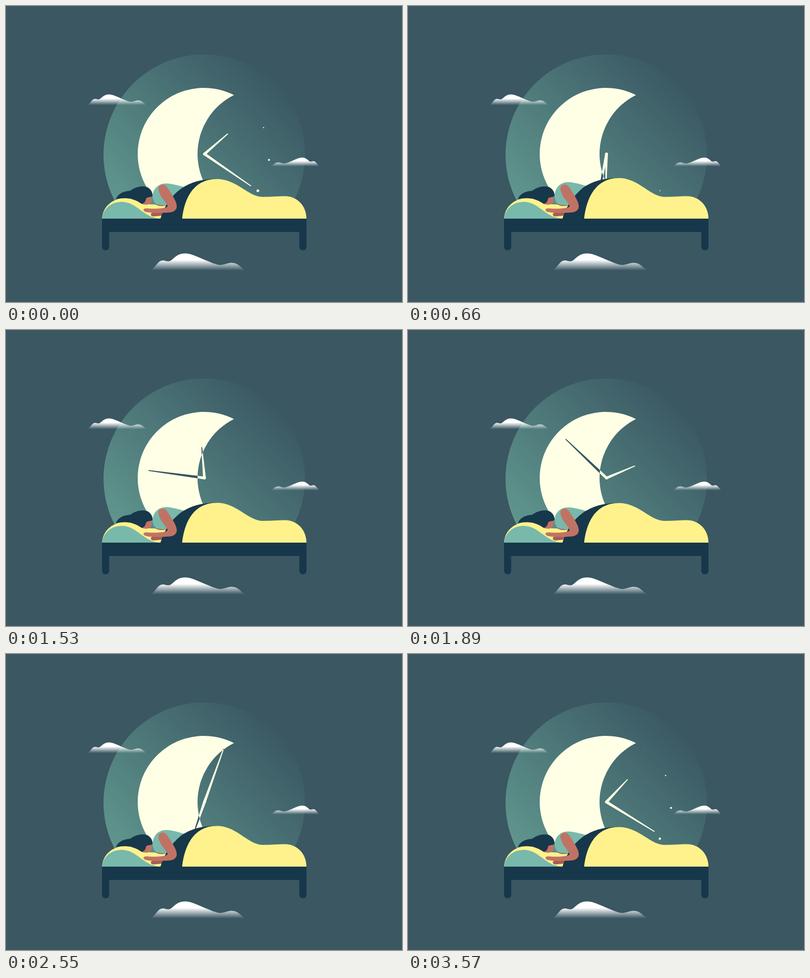
An HTML page that plays this animation: 800 by 600 pixels, repeating every 3.6 s.

```html
<!DOCTYPE html>
<html lang="en">
<head>
<meta charset="utf-8">
<title>Sleeping under the moon clock</title>
<style>
  html, body { margin: 0; width: 100%; height: 100%; overflow: hidden; background: #3a5762; }
  svg { display: block; width: 800px; height: 600px; }
</style>
</head>
<body>
<svg viewBox="0 0 800 600">
  <defs>
    <linearGradient id="sky" gradientUnits="userSpaceOnUse" x1="257" y1="445" x2="544" y2="158">
      <stop offset="0" stop-color="#60978e"/>
      <stop offset="1" stop-color="#3b5964"/>
    </linearGradient>
    <linearGradient id="mist" x1="0" y1="0" x2="0" y2="1">
      <stop offset=".38" stop-color="#fff"/>
      <stop offset="1" stop-color="#fff" stop-opacity="0"/>
    </linearGradient>
    <path id="crescent" d="M460.5,180.4 A134,134 0 1 0 460.5,419.6 A134,134 0 0 1 460.5,180.4Z"/>
    <clipPath id="inMoon"><use href="#crescent"/></clipPath>
    <clipPath id="aboveBed"><rect width="800" height="432"/></clipPath>
    <path id="cloud" d="M0,35 C9,28 13,18 20,15.500 C27,13 29,17 36,16.500 C45,15 49,0.500 69,0.500 C81,0.500 95,8 107,13 C120,18 132,24 140,24 C148,24 154,19.500 163,19.500 C176,19.500 180,28 190,35Z" fill="url(#mist)"/>
    <g id="hands">
      <path id="long" d="M-2.800,0 A2.800,2.800 0 0 0 2.800,0 L0.900,-113.500 A0.900,0.900 0 0 0 -0.900,-113.500Z"/>
      <path id="short" d="M-2.800,0 A2.800,2.800 0 0 0 2.800,0 L0.900,-62 A0.900,0.900 0 0 0 -0.900,-62Z"/>
    </g>
  </defs>

  <rect width="800" height="600" fill="#3a5762"/>
  <g clip-path="url(#aboveBed)">
    <circle cx="400.500" cy="301.500" r="203.500" fill="url(#sky)"/>
    <use href="#crescent" fill="#ffffe6"/>
    <use href="#hands" fill="#ffffe6"/>
    <g clip-path="url(#inMoon)"><use href="#hands" fill="#365460"/></g>
    <g id="dots" fill="#ffffe6"></g>
  </g>

  <use href="#cloud" transform="translate(293 501)"/>
  <use href="#cloud" transform="translate(165 179) scale(.626)"/>
  <use href="#cloud" transform="translate(633.500 307) scale(-.513 .513)"/>

  <path fill="#fff28c" d="M194,431 C196,404 218,389 243,389 C262,389 276,400 290,402 L330,403 L322,431Z"/>
  <path fill="#78b9ab" d="M194,431 C196,411 213,397 233,397 C266,397 276,429 312,431Z"/>
  <path fill="#a85d52" d="M300,400 C304,406 314,406 324,405 L324,400Z M296,419 L322,418 L314,425 L299,426.500 C291,427 291,420 296,419Z"/>
  <path id="shirt" fill="#78b9ab"/>
  <path fill="#c07364" d="M282,386 L293,385 C295,390 296,396 291,400.500 C286,404 278,403 273,400.500Z"/>
  <path fill="#17374b" d="M222,392 C225,381 238,375 251,374.500 C261,367 272,365 281,366 C290,367 297,377 296,385 C293,388 285,387 283,390 C282,397 278,401 274,401 C262,392 244,386 222,392Z"/>
  <path id="sheet" fill="#17374b"/>
  <path id="cover" fill="#fff28c"/>
  <path fill="#c07364" d="M308,372 C307,366 311,362 317,362 C322,362 325,366 328,371 C335,382 345,396 345,406 C345,414 338,418 330,418.500 C314,420 297,420 285,418 C279,417 277,414 278,412 C279,410 284,410 288,410.500 C300,411 312,411 323,408.500 C327,407 327,405 325,402 C318,392 310,384 308,372Z"/>

  <path fill="#17374b" d="M194,431 H607 V488 A7.200,7.200 0 0 1 592.500,488 V458 H208.500 V488 A7.200,7.200 0 0 1 194,488Z"/>
</svg>
<script>
  const LOOP = 3600, BREATH = 1800, STEP = 30;
  const START = 124.7;
  const byId = id => document.getElementById(id);
  const parts = {};
  for (const id of ["long", "short", "shirt", "sheet", "cover"]) parts[id] = byId(id);

  const dots = [[478.5, 194.8], [520.3, 246.3], [531.3, 312], [508.8, 374.4]].map(([x, y]) => {
    const node = document.createElementNS("http://www.w3.org/2000/svg", "circle");
    node.setAttribute("cx", x);
    node.setAttribute("cy", y);
    byId("dots").append(node);
    return { node, angle: Math.atan2(x - 401, 300 - y) * 180 / Math.PI };
  });

  const turn = (el, deg) => el.setAttribute("transform", `translate(401 300) rotate(${deg})`);
  const shape = (el, d) => el.setAttribute("d", d);

  // A dot swells just before the long hand arrives, then shrinks behind it.
  function dotSize(gap) {
    const d = ((gap + 20) % 360 + 360) % 360 - 20;
    return Math.max(0, d < 0 ? 2.7 * (1 + d / 20) : 2.7 - 0.026 * d);
  }

  function draw(t) {
    const angle = START + 360 * t / LOOP;
    turn(parts.long, angle);
    turn(parts.short, 48.9 + 720 * t / LOOP);
    for (const { node, angle: at } of dots) node.setAttribute("r", dotSize(angle - at));

    const air = (1 - Math.cos(2 * Math.PI * t / BREATH)) / 2;
    const chest = -3.2 * air, hip = -2.4 * air;
    shape(parts.shirt, `M296,386 C297,${369 + chest} 309,${360 + chest} 323,${359.7 + chest}
      C338,${360 + chest} 350,${365 + chest} 362,${367 + hip} L326,405 L308,403 C301,402 297,397 296,386Z`);
    shape(parts.sheet, `M312,431 C319,408 332,386 354,${370 + hip}
      C374,${357 + hip} 395,${350.5 + hip} 426,${350.8 + hip} L400,431Z`);
    shape(parts.cover, `M356,431 C360,396 375,${350.8 + hip} 426,${350.8 + hip}
      C466,${350.8 + hip} 488,386 518,387 C536,387 548,385.600 564,385.600 C590,386 607,407 607,431Z`);
  }

  const begin = performance.now();
  function tick() {
    const t = (performance.now() - begin) % LOOP;
    draw(Math.floor(t / STEP) * STEP);
    requestAnimationFrame(tick);
  }
  draw(0);
  requestAnimationFrame(tick);
</script>
</body>
</html>
```
